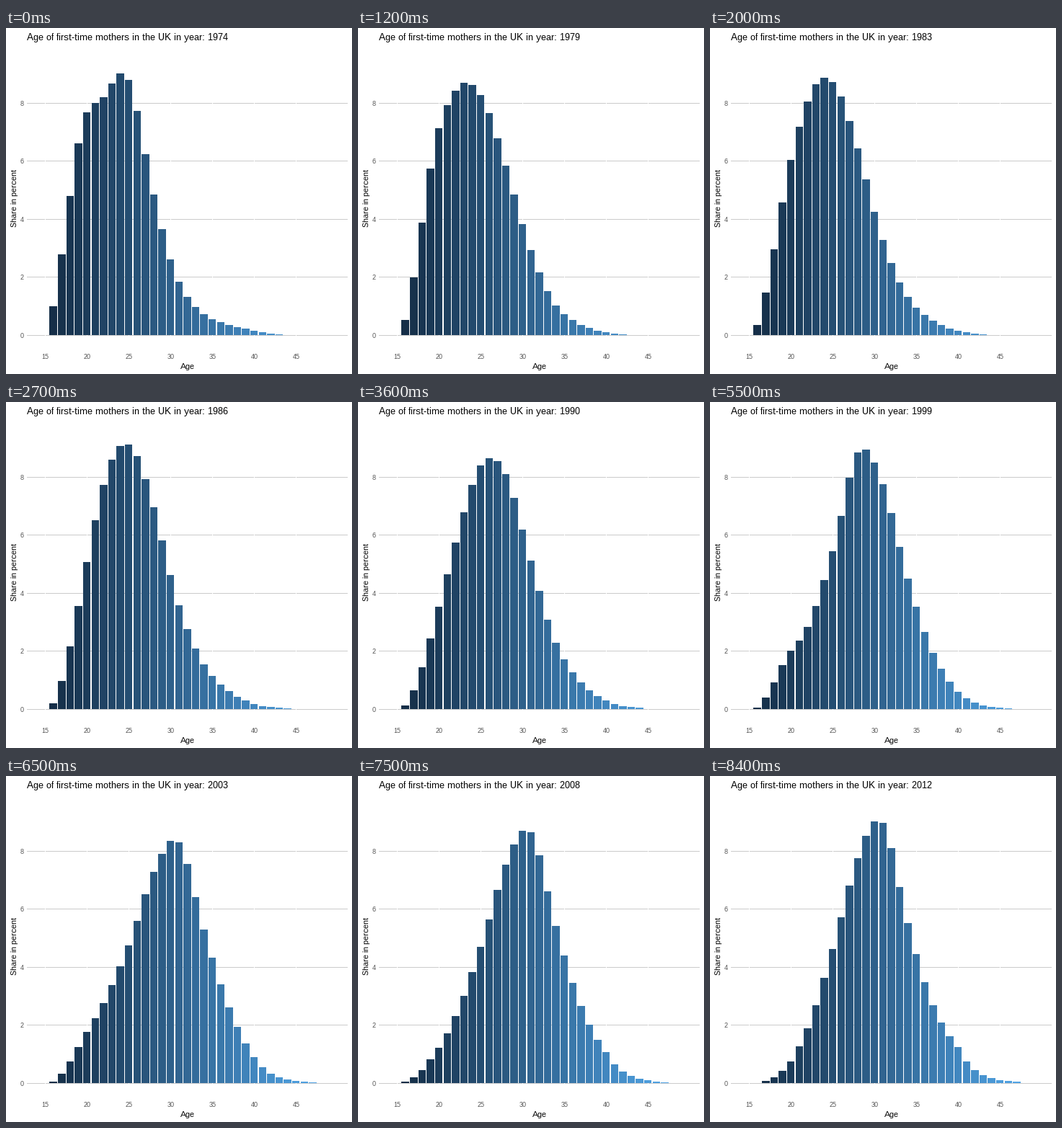
Animation of 480 by 480 pixels, one loop 10000 ms. Source, as a matplotlib script:

```python
import numpy as np
import matplotlib.pyplot as plt
from matplotlib.animation import FuncAnimation
from matplotlib.patches import Rectangle

plt.rcParams.update({
    "font.family": ["Liberation Sans", "DejaVu Sans"],
    "text.hinting": "native",  # whole-pixel glyph shapes and advances
    "text.hinting_factor": 1,
})

SIZE, DPI = 480, 96
STEPS, FRAMES, INTERVAL = 84, 100, 100  # the last picture is held
FIRST_YEAR, LAST_YEAR = 1974, 2012
BASE, UNIT = 426, 40.25                 # y of zero, pixels per percent
AGES = np.arange(16, 50)
GAP = 3                                 # years between key points
TAIL = 0.61                             # yearly decay after the last key point

# Share of first births in percent at ages 16, 19, ... 40, by animation step
KEY_SHARES = {
    0: (1.0, 6.62, 8.2, 8.8, 4.85, 1.83, .71, .36, .16),
    12: (.53, 5.75, 8.42, 8.28, 5.84, 2.94, 1.03, .36, .1),
    27: (.2, 3.56, 7.73, 9.12, 6.95, 3.59, 1.55, .62, .18),
    44: (.06, 1.43, 3.96, 7.75, 9.12, 6.46, 2.94, 1.18, .38),
    55: (.06, 1.52, 2.84, 5.45, 8.85, 7.75, 4.5, 1.95, .6),
    65: (.06, 1.25, 2.76, 4.75, 7.28, 8.3, 5.3, 2.6, .9),
    84: (.02, .41, 1.9, 4.63, 7.75, 8.97, 5.52, 2.69, 1.23),
}


def fill_ages(shares):
    """Smooth cubic through the square roots of the shares, then a decaying tail."""
    roots = np.sqrt(shares)
    slopes = np.gradient(roots, edge_order=2)
    pos = (AGES - AGES[0]) / GAP
    i = np.minimum(pos.astype(int), len(roots) - 2)
    t = np.minimum(pos - i, 1)
    curve = ((1 + 2 * t) * (1 - t) ** 2 * roots[i]
             + t * (1 - t) ** 2 * slopes[i]
             + t ** 2 * (3 - 2 * t) * roots[i + 1]
             + t ** 2 * (t - 1) * slopes[i + 1])
    years_past = np.maximum(pos - len(roots) + 1, 0) * GAP
    return curve ** 2 * TAIL ** years_past


KEY_STEPS = list(KEY_SHARES)
KEY_CURVES = np.array([fill_ages(s) for s in KEY_SHARES.values()])


def age_x(age):
    return 54.1 + (age - 15) * 11.605


def age_color(age):
    t = (age - 15) / 35
    dark, light = np.array([19, 43, 67]), np.array([86, 177, 247])
    return (dark + t * (light - dark) - t * (1 - t) * np.array([4, 16, 20])) / 255


fig = plt.figure(figsize=(SIZE / DPI, SIZE / DPI), dpi=DPI, facecolor="white")
ax = fig.add_axes([0, 0, 1, 1])
ax.set(xlim=(0, SIZE), ylim=(SIZE, 0))
ax.axis("off")


def block(left, top, right, bottom, color):
    return ax.add_patch(Rectangle((left, top), right - left, bottom - top,
                                  facecolor=color, linewidth=0, antialiased=False))


def label(x, y, text, px, color="black", **kwargs):
    return ax.text(x, y, text, fontsize=px * 72 / DPI, color=color,
                   **{"va": "baseline", **kwargs})


for value in range(0, 10, 2):
    y = int(BASE - value * UNIT)
    block(29, y, 474, y + 1, "#cbcbcb")
    label(24.3, y + 4, str(value), 9, "#4d4d4d", ha="right")
for age in range(15, 50, 5):
    x = round(age_x(age))
    block(x, 30, x + 1, 446, "white")
    label(x + 0.5, 459, str(age), 9, "#4d4d4d", ha="center")

label(251.5, 473, "Age", 11, ha="center")
label(15, 236, "Share in percent", 11, ha="center", rotation=90,
      rotation_mode="anchor")
title = label(29, 17, "", 13)
bars = [block(round(age_x(a) - 5.22), BASE, round(age_x(a) + 5.22), BASE, age_color(a))
        for a in AGES]


def update(frame):
    step = min(frame, STEPS)
    year = round(FIRST_YEAR + step * (LAST_YEAR - FIRST_YEAR) / STEPS)
    title.set_text(f"Age of first-time mothers in the UK in year: {year}")
    for bar, curve in zip(bars, KEY_CURVES.T):
        height = np.interp(step, KEY_STEPS, curve) * UNIT
        bar.set_visible(height >= 1)
        bar.set_y(BASE - round(height))
        bar.set_height(round(height))
    return [title, *bars]


anim = FuncAnimation(fig, update, frames=FRAMES, interval=INTERVAL,
                     repeat=True, repeat_delay=0)
plt.show()
```
